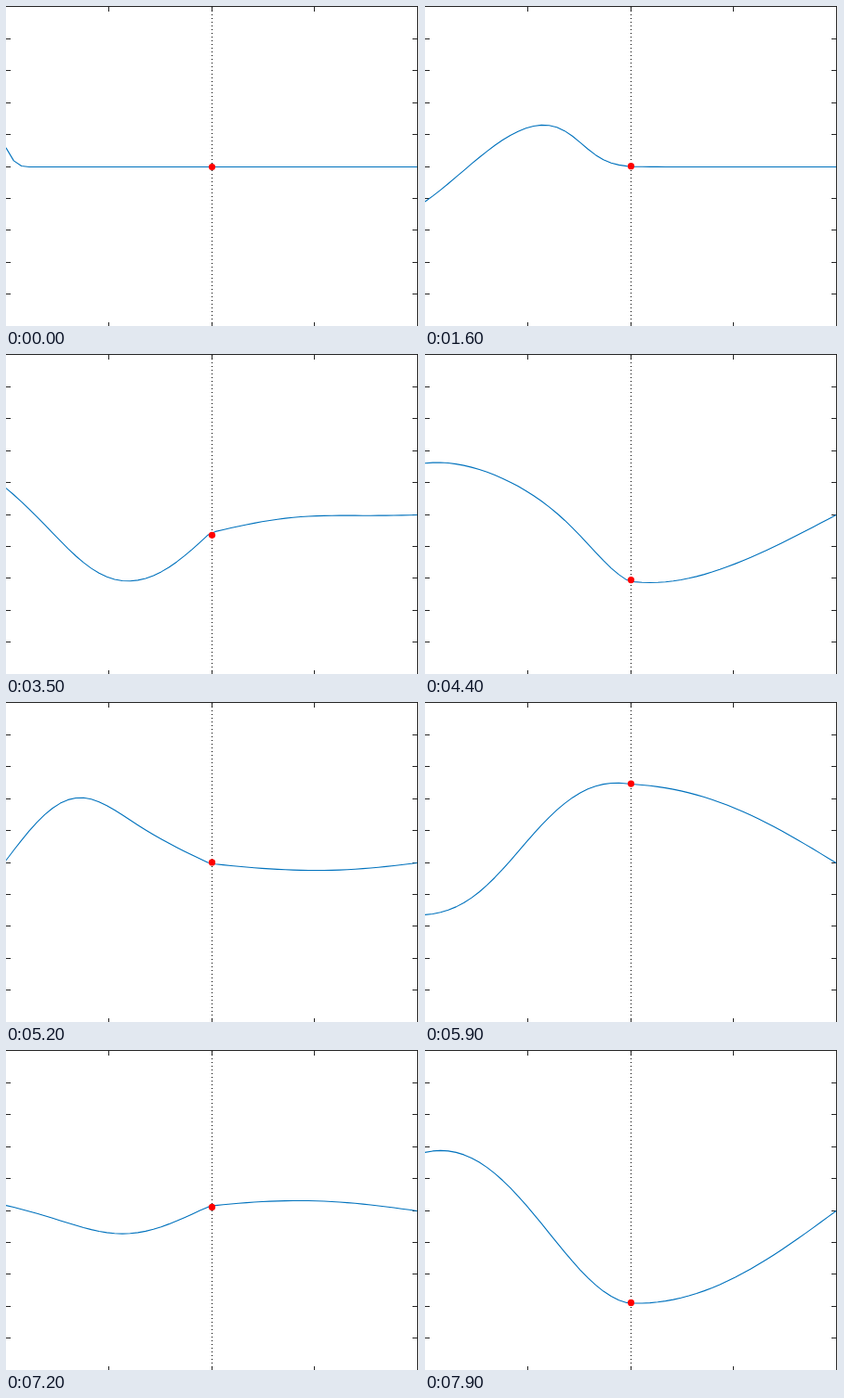
Recreate the animation shown at these times as an HTML page. Size 444 by 345 pixels, loop 8000 ms.

```html
<!DOCTYPE html>
<html lang="en">
<head>
<meta charset="utf-8">
<title>Wave crossing between two media</title>
<style>
  html, body { margin: 0; width: 100%; height: 100%; overflow: hidden; background: #fff; }
  svg { display: block; }
  .axes { fill: none; stroke: #262626; shape-rendering: crispEdges; }
  .divider { stroke: #000; stroke-dasharray: 1 3; shape-rendering: crispEdges; }
  .string { fill: none; stroke: #0072bd; stroke-width: 1.1; stroke-linejoin: round; }
  .marker { fill: #f00; }
</style>
</head>
<body>
<svg width="444" height="345" viewBox="0 0 444 345">
  <path class="axes" id="axes"/>
  <path class="divider" d="M221.5 1V345"/>
  <polyline class="string" id="string"/>
  <circle class="marker" id="marker" cx="221.5" r="3.6"/>
</svg>
<script>
const WIDTH = 442, HEIGHT = 345, REST_Y = 173.5;
const FRAMES = 80, FRAME_MS = 100;

// String model: lengths in pixels, times in seconds
const CELLS = 53, MID = 26, H = WIDTH / CELLS;
const SPEED = 109.4, VISCOSITY = 0.017;
const DT = 0.01, STEPS = 10, START = -0.09;
const DRIVE = 68.8, OMEGA = Math.PI / 2;
const RELAX = 0.2, COUPLING = 0.1 * SPEED / H;

// The right half carries waves twice as fast as the left half
const stiffness = Array.from({ length: CELLS }, (_, i) =>
  (i < MID ? 1 : i === MID ? 2 : 4) * (SPEED / H) ** 2);

function simulate() {
  const u = new Array(CELLS + 1).fill(0);
  const v = u.slice();
  const frames = [];
  let time = START;

  function step() {
    const pull = stiffness.map((k, i) =>
      k * (u[i + 1] - u[i] + VISCOSITY * (v[i + 1] - v[i])));
    const drive = DRIVE * Math.cos(OMEGA * (time - START));
    v[0] = (drive - u[0] + COUPLING * (u[1] - u[0])) / RELAX;
    for (let i = 1; i < CELLS; i++) v[i] += DT * (pull[i] - pull[i - 1]);
    for (let i = 0; i < CELLS; i++) u[i] += DT * v[i];
    time += DT;
  }

  for (let n = 0; n < FRAMES; n++) {
    const count = n ? STEPS : Math.round(-START / DT);
    for (let s = 0; s < count; s++) step();
    frames.push(u.slice());
  }
  return frames;
}

function axesPath() {
  let d = `M0 .5H442.5V${HEIGHT}`;
  for (let i = 1; i < 4; i++) {
    const x = Math.floor(i * WIDTH / 4 + 0.2) + 0.5;
    d += `M${x} 1v5M${x} ${HEIGHT}v-4`;
  }
  for (let i = 1; i < 10; i++) {
    const y = Math.floor(i * 34.4 + 1) + 0.5;
    d += `M0 ${y}h5M442 ${y}h-5`;
  }
  return d;
}

const frames = simulate();
const string = document.getElementById("string");
const marker = document.getElementById("marker");
document.getElementById("axes").setAttribute("d", axesPath());

function draw(ms) {
  const u = frames[Math.floor(ms / FRAME_MS) % FRAMES];
  string.setAttribute("points",
    u.map((h, i) => `${(i * H).toFixed(2)},${(REST_Y - h).toFixed(2)}`).join(" "));
  marker.setAttribute("cy", (REST_Y - u[MID]).toFixed(2));
}

const begin = performance.now();
function tick() {
  draw(performance.now() - begin);
  requestAnimationFrame(tick);
}
tick();
</script>
</body>
</html>
```
